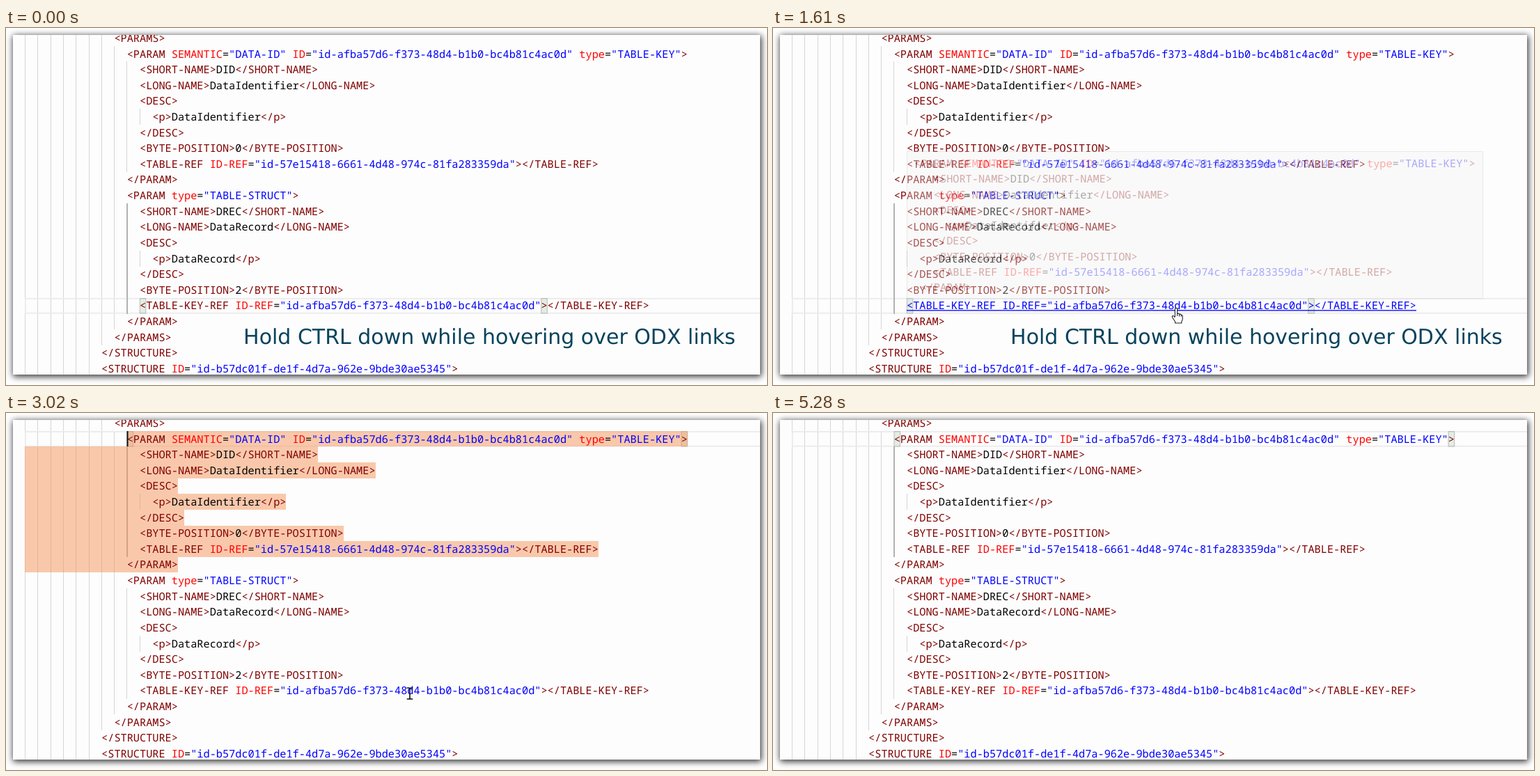
An HTML page for the animation above (5.45 s loop, 1093x513 px).

```html
<!DOCTYPE html>
<html lang="en">
<head>
<meta charset="utf-8">
<title>ODX link navigation</title>
<style>
  html, body { margin: 0; width: 100%; height: 100%; overflow: hidden; background: #fff; }
  #win { position: absolute; left: 10px; top: 10px; width: 1073px; height: 488px;
         background: #fdfdfd; box-shadow: 1px 2px 9px 1px rgba(0, 0, 0, .8); }
  svg { display: block; width: 1073px; height: 488px; }
  text { font: 15.25px "Noto Sans Mono", monospace; text-rendering: geometricPrecision; white-space: pre; }
  .tag { fill: #800000; }
  .attr { fill: #f00; }
  .val { fill: #00f; }
  .link text { fill: #00f; }
  .under { display: none; fill: #00f; }
  .link .under { display: inline; }
  .guide { fill: #d6d6d6; }
  .active { fill: #8f8f8f; }
  .line { fill: none; stroke: #ebebeb; stroke-width: 1.7; }
  .bracket { fill: rgba(0, 100, 0, .1); stroke: #b9b9b9; }
  .range { fill: rgba(245, 147, 91, .5); }
  #caption { font: 30px "DejaVu Sans", Verdana, sans-serif; fill: #07435c; }
</style>
</head>
<body>
<div id="win"><svg id="stage" viewBox="10 10 1073 488"></svg></div>
<script>
const LOOP = 5450, X0 = 27.3, CW = 9.15, TOP = 3.2, ROW = 22.62, LINK_ROW = 17;

// Indent depth, then the markup of the line.
const code = [
  [7, '<PARAMS>'],
  [8, '<PARAM SEMANTIC="DATA-ID" ID="id-afba57d6-f373-48d4-b1b0-bc4b81c4ac0d" type="TABLE-KEY">'],
  [9, '<SHORT-NAME>DID</SHORT-NAME>'],
  [9, '<LONG-NAME>DataIdentifier</LONG-NAME>'],
  [9, '<DESC>'],
  [10, '<p>DataIdentifier</p>'],
  [9, '</DESC>'],
  [9, '<BYTE-POSITION>0</BYTE-POSITION>'],
  [9, '<TABLE-REF ID-REF="id-57e15418-6661-4d48-974c-81fa283359da"></TABLE-REF>'],
  [8, '</PARAM>'],
  [8, '<PARAM type="TABLE-STRUCT">'],
  [9, '<SHORT-NAME>DREC</SHORT-NAME>'],
  [9, '<LONG-NAME>DataRecord</LONG-NAME>'],
  [9, '<DESC>'],
  [10, '<p>DataRecord</p>'],
  [9, '</DESC>'],
  [9, '<BYTE-POSITION>2</BYTE-POSITION>'],
  [9, '<TABLE-KEY-REF ID-REF="id-afba57d6-f373-48d4-b1b0-bc4b81c4ac0d"></TABLE-KEY-REF>'],
  [8, '</PARAM>'],
  [7, '</PARAMS>'],
  [6, '</STRUCTURE>'],
  [6, '<STRUCTURE ID="id-b57dc01f-de1f-4d7a-962e-9bde30ae5345">']
];

const rowTop = i => TOP + ROW * i;
const colX = c => X0 + CW * c;
const lineEnd = i => colX(code[i][0] * 2 + code[i][1].length);
const escapeXml = s => s.replace(/</g, '&lt;').replace(/>/g, '&gt;');
const rect = (cls, x, y, w, h) =>
  `<rect class="${cls}" x="${x}" y="${y}" width="${w}" height="${h}"/>`;

function tokenClass(s, next) {
  if (/^[<>]/.test(s)) return 'tag';
  if (s[0] === '"') return 'val';
  return next === '=' ? 'attr' : 'plain';
}

function markup(src, x, y) {
  const tokens = src.match(/<\/?[\w-]+|>|\s+|"[^"]*"|=|[^<>\s="]+/g);
  let col = 0;
  return tokens.map((s, i) => {
    const tx = x + col * CW;
    col += s.length;
    return s.trim() &&
      `<text class="${tokenClass(s, tokens[i + 1])}" x="${tx}" y="${y}">${escapeXml(s)}</text>`;
  }).join('');
}

function guides() {
  let out = '';
  code.forEach(([depth], i) => {
    for (let k = 0; k < depth; k++)
      out += rect('guide', Math.round(27 + 18.3 * k), Math.round(rowTop(i)), 1, 23);
  });
  return out;
}

// Current line frame, active guide and bracket pair for a focused row.
function focus(id, row, closeCol, guideRow) {
  const y = Math.round(rowTop(row)), open = code[row][0] * 2;
  const box = c => rect('bracket', colX(c) + .3, y + .5, CW - .6, 21.5);
  return `<g id="${id}">` +
    rect('line', 27.9, y + .9, 1100, 20.8) +
    rect('active', 173.5, Math.round(rowTop(guideRow)), 1.2, 159) +
    box(open) + box(closeCol) + '</g>';
}

function range() {
  let out = rect('range', colX(16), rowTop(1), lineEnd(1) - colX(16), ROW);
  for (let i = 2; i < 10; i++) out += rect('range', 27, rowTop(i), lineEnd(i) - 27, ROW);
  return `<g id="range" shape-rendering="crispEdges">${out}</g>`;
}

function rows() {
  return code.map(([depth, src], i) => {
    const x = colX(depth * 2), y = rowTop(i) + 16.7;
    const under = i === LINK_ROW ? rect('under', x, 405.2, lineEnd(i) - x, 1.3) : '';
    return `<g id="row${i}">${markup(src, x, y)}${under}</g>`;
  }).join('');
}

function tooltip() {
  const lines = code.slice(1, 10).map(([depth, src], i) => {
    const indent = i === 0 ? 0 : depth * 2 - 15;
    return markup(src, 203.4 + indent * CW, 199.9 + 22.3 * i);
  }).join('');
  return `<g id="tip"><rect x="192.5" y="177.5" width="827" height="211.5" fill="#f2f2f2" stroke="#c2c2c2"/>${lines}</g>`;
}

const cursors = `
  <circle id="click" cx="578.5" cy="402" r="11.3" fill="#f7d52c"/>
  <rect id="caret" width="2" height="22" fill="#111"/>
  <g id="beam" fill="none" stroke-linecap="square">
    <path d="M-3.5-8H-1.5Q0-8 0-6.5Q0-8 1.5-8H3.5M0-6.5V6.5M-3.5 8H-1.5Q0 8 0 6.5Q0 8 1.5 8H3.5" stroke="#111" stroke-width="1.6"/>
  </g>
  <path id="hand" fill="#fff" stroke="#222" stroke-width="1.1" stroke-linejoin="round"
    d="M-2.6 12V1a1.6 1.6 0 0 1 3.2 0V7.4q2.5-.8 2.9.9q2.2-.6 2.7 1q2-.2 2 1.6V15q0 2-1.4 3.8V21H-2.4V19L-6.2 13.2q-1-2 .4-2.6q1.2-.3 3.2 2.2M.6 7.4V11M3.5 8.3V11.4M6.2 9.3V11.8"/>`;

const stage = document.getElementById('stage');
stage.innerHTML = guides() +
  focus('focusRef', LINK_ROW, 81, 11) + focus('focusKey', 1, 103, 2) +
  range() + rows() + tooltip() + cursors +
  '<text id="caption" x="341.1" y="454">Hold CTRL down while hovering over ODX links</text>';

const el = {};
stage.querySelectorAll('[id]').forEach(n => el[n.id] = n);

const show = (n, on) => n.style.display = on ? 'inline' : 'none';
const moveTo = (n, x, y) => n.setAttribute('transform', `translate(${x} ${y})`);
const mix = (a, b, u) => a.map((v, i) => v + (b[i] - v) * u);
const step = (t, start, len, max) => Math.min(max, Math.floor((t - start) / len));

const ENTER = [956, 492], TURN = [638.5, 426], REST = [580, 403], LEAVE = [1026.5, 493.5];

function pointer(t) {
  if (t < 130 || t >= 4980) return null;
  if (t < 750) return mix(ENTER, TURN, 1 - (1 - step(t, 130, 77.1, 7) / 7) ** 1.6);
  if (t < 1300) return mix(TURN, REST, (step(t, 750, 78.3, 6) + 1) / 8);
  if (t < 4430) return REST;
  return mix(REST, LEAVE, ((step(t, 4430, 78.3, 6) + 1) / 7) ** 1.4);
}

function draw(t) {
  const pos = pointer(t), jumped = t >= 2940;
  const linked = !jumped && t < 4430 && pos !== null && pos[1] < 410;

  el['row' + LINK_ROW].setAttribute('class', linked ? 'link' : '');
  show(el.focusRef, !jumped);
  show(el.focusKey, jumped);
  show(el.range, jumped && t < 3340);
  show(el.caption, t < 2770);

  show(el.tip, t >= 1610 && t < 2770);
  el.tip.style.opacity = (step(t, 1610, 65, 2) + 1) / 3;

  show(el.click, t >= 2770 && t < 3020);
  el.click.style.opacity = jumped ? .3 : .75;
  show(el.caret, t >= 2770 && t < 5280);
  moveTo(el.caret, jumped ? 173.5 : 577, Math.round(rowTop(jumped ? 1 : LINK_ROW)));

  show(el.hand, linked);
  show(el.beam, pos && !linked);
  if (pos) moveTo(linked ? el.hand : el.beam, ...pos);
}

function tick() {
  draw(performance.now() % LOOP);
  requestAnimationFrame(tick);
}
tick();
</script>
</body>
</html>
```
